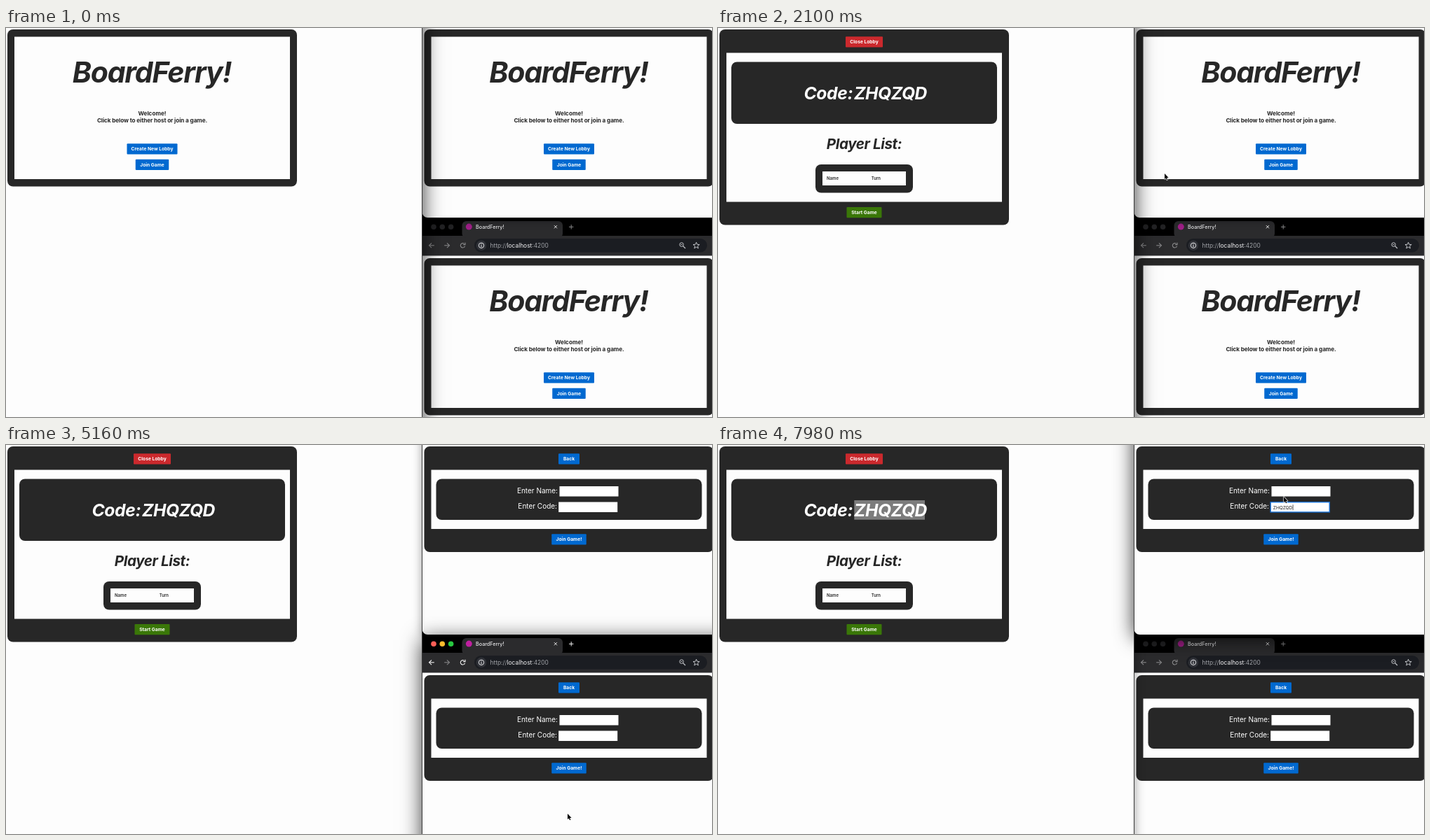
Recreate the animation shown at these times as an HTML page with a canvas. Size 1007 px wide and 556 px high, loop 8000 ms.

```html
<!DOCTYPE html>
<html lang="en">
<head>
<meta charset="utf-8">
<title>BoardFerry!</title>
<style>
html, body { margin: 0; width: 100%; height: 100%; overflow: hidden; background: #fdfdfd; }
canvas { display: block; width: 1007px; height: 556px; }
</style>
</head>
<body>
<canvas id="stage"></canvas>
<script>
const W = 1007, H = 556, LOOP = 8000;
const BRAND = 'BoardFerry!', CODE = 'ZHQZQD';
const PAPER = '#fdfdfd', DARK = '#272727', BLUE = '#0069d0', RED = '#cb292d', GREEN = '#3a7708';
const MID = 208.5, RIGHT = 594.5, LOW = 327;

const canvas = document.getElementById('stage');
const ctx = canvas.getContext('2d');
const dpr = window.devicePixelRatio || 1;
canvas.width = W * dpr;
canvas.height = H * dpr;

// Moments at which something switches, in ms
const T = { lobby: 1240, focusTop: 3300, joinTop: 3420, focusLow: 4760, joinLow: 4880,
            focusLeft: 6160, select: 6240, focusField: 7260, paste: 7500 };

// Pointer stops: time, x, y
const STOPS = [
  [280, 300, -16], [680, 238, 147], [980, 214, 173], [1400, 214, 173],
  [2100, 637, 208], [2800, 795, 195], [3480, 795, 195],
  [4500, 801, 522], [4900, 801, 522], [5080, 801, 527], [5250, 801, 527],
  [6050, 272, 98], [6200, 275, 99], [6480, 275, 99],
  [7150, 812, 89], [7640, 812, 89], [7980, 807, 74]
];

function pointer(t) {
  if (t < STOPS[0][0]) return null;
  let i = 1;
  while (i < STOPS.length - 1 && t > STOPS[i][0]) i++;
  const a = STOPS[i - 1], b = STOPS[i];
  const k = Math.min(1, (t - a[0]) / (b[0] - a[0]));
  const e = k * k * (3 - 2 * k);
  return [a[1] + (b[1] - a[1]) * e, a[2] + (b[2] - a[2]) * e];
}

function box(x, y, w, h, fill, r = 0) {
  ctx.fillStyle = fill;
  ctx.beginPath();
  ctx.roundRect(x, y, w, h, r);
  ctx.fill();
}

function text(s, x, y, size, { weight = 700, color = DARK, align = 'center', italic = false, gap = 0 } = {}) {
  ctx.font = `${italic ? 'italic ' : ''}${weight} ${size}px Inter, "Liberation Sans", sans-serif`;
  ctx.letterSpacing = gap + 'px';
  ctx.textAlign = align;
  ctx.fillStyle = color;
  ctx.fillText(s, x, y);
  ctx.letterSpacing = '0px';
}

function line(points, color, width) {
  ctx.strokeStyle = color;
  ctx.lineWidth = width;
  ctx.beginPath();
  points.forEach(([x, y]) => ctx.lineTo(x, y));
  ctx.stroke();
}

function button(label, y, w, fill) {
  box(MID - w / 2, y, w, 15.3, fill, 1);
  text(label, MID, y + 10.1, 6.7, { color: '#fff' });
}

function card(h) {
  box(2, 2, 413, h, DARK, 8);
}

function home() {
  card(224.5);
  box(12, 12.5, 393, 203.5, PAPER);
  text(BRAND, MID - 0.5, 77.5, 41, { italic: true, gap: -1.2 });
  text('Welcome!', MID, 125, 8.2);
  text('Click below to either host or join a game.', MID, 135, 8.2, { gap: -0.1 });
  button('Create New Lobby', 165.3, 72, BLUE);
  button('Join Game', 187.8, 47.5, BLUE);
}

function lobby(mark) {
  card(279.5);
  button('Close Lobby', 12.3, 53, RED);
  box(12, 35.5, 393, 213, PAPER);
  box(19, 48.5, 379, 88.5, DARK, 8);
  if (mark) box(194.3, 79, 100.7, 27.8, mark);
  const head = { italic: true, color: '#fff', align: 'left', gap: -0.4 };
  text('Code:', 122.5, 102, 24.7, head);
  text(CODE, 194, 102, 24.7, head);
  text('Player List:', MID, 173.3, 20.6, { italic: true, gap: -0.4 });
  box(139, 195, 139, 40.5, DARK, 8);
  box(149, 205, 119, 20, PAPER);
  text('Name', 155, 217, 6, { align: 'left', weight: 600 });
  text('Turn', 218.7, 217, 6, { align: 'left', weight: 600 });
  button('Start Game', 256, 50, GREEN);
}

function join(t, top) {
  card(151);
  button('Back', 12.3, 30, BLUE);
  box(12, 35.5, 393, 84.5, PAPER);
  box(19, 48.5, 379, 58.5, DARK, 8);
  const label = { weight: 400, color: '#fff', align: 'right' };
  text('Enter Name:', 192.5, 68.7, 10, label);
  text('Enter Code:', 191.5, 91, 10, label);
  box(195, 59, 84, 14.5, '#fff');
  box(193.7, 81.5, 84, 14.5, '#fff');
  button('Join Game!', 127.3, 49.5, BLUE);
  if (!top || t < T.focusField) return;
  ctx.strokeStyle = '#1a73d9';
  ctx.lineWidth = 1.4;
  ctx.strokeRect(193.7, 81.7, 84, 14.2);
  const pasted = t >= T.paste;
  if (pasted) text(CODE, 197.3, 91.6, 6.5, { weight: 400, color: '#222', align: 'left' });
  box(pasted ? 225.2 : 197.3, 85.3, 0.7, 8, '#111');
}

function chrome(active) {
  box(593, 271, 430, 27, '#000');
  box(593, 297, 430, 28.5, '#2b2b2d');
  box(650.5, 276, 143.5, 24, '#2b2b2d', 6);
  ['#fe5f57', '#febc2e', '#28c840'].forEach((c, i) => {
    ctx.fillStyle = active ? c : '#232325';
    ctx.beginPath();
    ctx.arc(610 + 12.3 * i, 284.3, 3.8, 0, 7);
    ctx.fill();
  });
  box(655.8, 279.6, 9, 9, active ? '#c01fa0' : '#a01f88', 4.5);
  text(BRAND, 670, 287, 7.2, { weight: 500, color: '#e6e6e8', align: 'left' });
  const lit = active ? '#f2f2f2' : '#8b8b8d', dim = '#858587';
  line([[781.8, 282.1], [786, 286.3]], '#e2e2e2', 1);
  line([[786, 282.1], [781.8, 286.3]], '#e2e2e2', 1);
  line([[803, 284.3], [809.4, 284.3]], lit, 1);
  line([[806.2, 281.1], [806.2, 287.5]], lit, 1);
  arrow(607, 1, lit);
  arrow(629, -1, dim);
  ctx.strokeStyle = lit;
  ctx.lineWidth = 1.1;
  ctx.beginPath();
  ctx.arc(651.5, 310.8, 3.2, 0.3, 5.4);
  ctx.stroke();
  line([[655, 306.8], [655, 309.6], [652.2, 309.6]], lit, 1.1);

  box(668, 301, 332, 19.5, '#1b1d22', 9.8);
  box(670.8, 303.6, 14.4, 14.4, '#303238', 7.2);
  ctx.strokeStyle = '#e8e8ea';
  ctx.lineWidth = 1;
  ctx.beginPath();
  ctx.arc(678, 310.8, 3.7, 0, 7);
  ctx.stroke();
  box(677.5, 310.2, 1, 2.8, '#e8e8ea');
  box(677.5, 308.5, 1, 1, '#e8e8ea');
  let x = 690.5;
  [['http://', '#a2a4a9'], ['localhost', '#f0f0f2'], [':4200', '#a2a4a9']].forEach(([s, color]) => {
    text(s, x, 313.8, 8.4, { weight: 400, color, align: 'left' });
    x += ctx.measureText(s).width;
  });
  ctx.strokeStyle = '#c4c6ca';
  ctx.beginPath();
  ctx.arc(963.6, 309.6, 2.8, 0, 7);
  ctx.stroke();
  line([[965.7, 311.7], [969, 315]], '#c4c6ca', 1.2);
  line([[962.2, 309.6], [965, 309.6]], '#c4c6ca', 0.8);
  const star = [];
  for (let i = 0; i <= 10; i++) {
    const a = i * Math.PI / 5 - Math.PI / 2, r = i % 2 ? 2.1 : 4.8;
    star.push([984.6 + r * Math.cos(a), 311 + r * Math.sin(a)]);
  }
  line(star, '#d0d2d6', 0.9);
}

function arrow(x, dir, color) {
  line([[x + 3.8 * dir, 310.8], [x - 3.2 * dir, 310.8]], color, 1.1);
  line([[x, 307.4], [x - 3.5 * dir, 310.8], [x, 314.2]], color, 1.1);
}

function frame(x, y, w, h, active, radius = 0) {
  ctx.save();
  ctx.shadowColor = active ? 'rgba(0,0,0,.8)' : 'rgba(0,0,0,.4)';
  ctx.shadowBlur = (active ? 28 : 14) * dpr;
  ctx.shadowOffsetY = (active ? 6 : 3) * dpr;
  box(x, y, w, h, PAPER, radius);
  ctx.restore();
}

function at(x, y, paint) {
  ctx.save();
  ctx.translate(x, y);
  paint();
  ctx.restore();
}

const windows = {
  left(t, active) {
    frame(-60, -80, 653.5, 740, active);
    const mark = t >= T.select && (active ? '#4d7cab' : '#7c7c7c');
    t < T.lobby ? home() : lobby(mark);
  },
  top(t, active) {
    frame(593.5, -80, 480, 351, active, 8);
    at(RIGHT, 0, () => t < T.joinTop ? home() : join(t, true));
  },
  low(t, active) {
    frame(593.5, 271.5, 480, 400, active);
    chrome(active);
    at(RIGHT, LOW, () => t < T.joinLow ? home() : join(t, false));
  }
};

// Back to front; the last one has the focus
function stack(t) {
  if (t < T.focusTop) return ['low', 'top', 'left'];
  if (t < T.focusLow) return ['low', 'left', 'top'];
  if (t < T.focusLeft) return ['left', 'top', 'low'];
  if (t < T.focusField) return ['top', 'low', 'left'];
  return ['low', 'left', 'top'];
}

function shape(points, fill, edge) {
  ctx.beginPath();
  points.forEach(([x, y]) => ctx.lineTo(x, y));
  ctx.closePath();
  ctx.lineJoin = 'round';
  ctx.strokeStyle = edge;
  ctx.lineWidth = 1.2;
  ctx.stroke();
  ctx.fillStyle = fill;
  ctx.fill();
  ctx.lineJoin = 'miter';
}

function drawArrow() {
  shape([[0, 0], [0, 8], [1.8, 6.4], [3.1, 9.3], [4.4, 8.7], [3.1, 5.9], [5.6, 5.9]], '#000', '#fff');
}

function drawHand() {
  shape([[-0.9, 0], [0.4, 0], [0.7, 3.4], [4, 4.2], [4.6, 5.2], [4, 9.6], [-0.6, 9.6],
    [-3.6, 5.9], [-2.7, 5.1], [-0.9, 6.4]], '#fff', '#111');
}

function drawBeam() {
  for (const [color, width] of [['#fff', 1.8], ['#222', 0.9]]) {
    line([[0, -4], [0, 4]], color, width);
    line([[-2, -5], [0, -4], [2, -5]], color, width);
    line([[-2, 5], [0, 4], [2, 5]], color, width);
  }
}

function within(x, y, l, t, w, h) {
  return x >= l && x <= l + w && y >= t && y <= t + h;
}

function cursor(t) {
  const p = pointer(t);
  if (!p) return;
  const [x, y] = p;
  const overButton =
    (t < T.lobby && within(x, y, 173, 165, 72, 15)) ||
    (t < T.joinTop && within(x, y, 779, 188, 48, 15)) ||
    (t < T.joinLow && within(x, y, 779, 515, 48, 15));
  const overText =
    (t > T.lobby && within(x, y, 122, 79, 173, 28)) ||
    (t > T.joinTop && within(x, y, 788, 81, 84, 15));
  at(x, y, overButton ? drawHand : overText ? drawBeam : drawArrow);
}

function draw(now) {
  const t = now % LOOP;
  ctx.setTransform(dpr, 0, 0, dpr, 0, 0);
  box(0, 0, W, H, '#000');
  const order = stack(t);
  order.forEach((name, i) => windows[name](t, i === order.length - 1));
  box(593, 0, 1, H, '#3a3a3a');
  cursor(t);
  requestAnimationFrame(draw);
}
requestAnimationFrame(draw);
</script>
</body>
</html>
```
